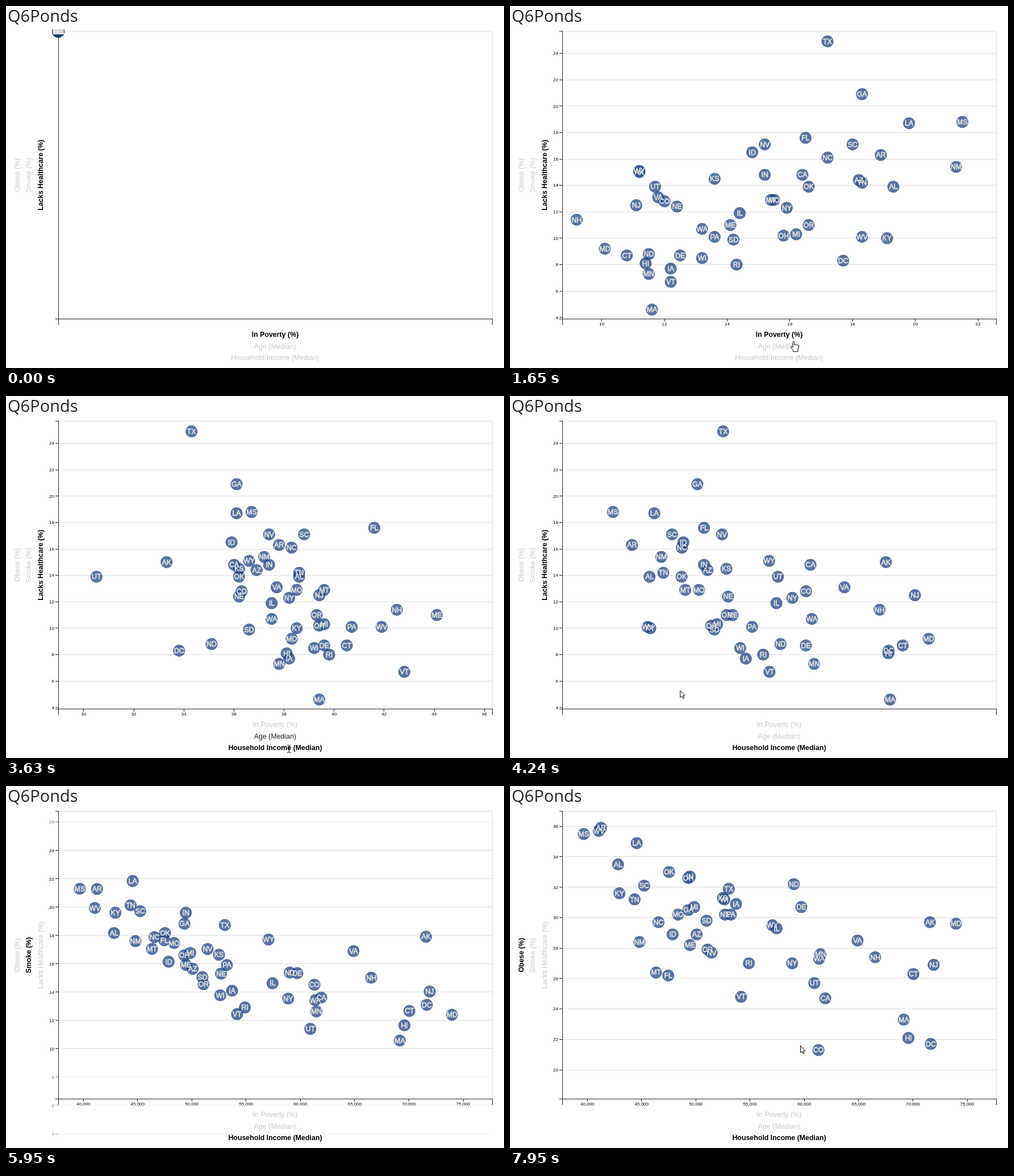
Write an HTML page that moves like this. It is 877x639 px and loops after 8 s.

```html
<!DOCTYPE html>
<html lang="en">
<head>
<meta charset="utf-8">
<title>Q6Ponds</title>
<style>
  html, body { margin: 0; width: 100%; height: 100%; overflow: hidden; background: #fff; }
  svg { display: block; width: 877px; height: 639px; font-family: "Liberation Sans", Arial, sans-serif; }
  .title { font: 500 29px "Open Sans", "Noto Sans", sans-serif; fill: #212529; }
  .axis, .frame, .tick line { fill: none; stroke: #222; shape-rendering: crispEdges; }
  .frame, .tick .grid { stroke: #ddd; }
  .tick text { font-size: 8px; fill: #000; }
  .label { font-size: 12.4px; text-anchor: middle; }
  .dots circle { fill: #1e4484; fill-opacity: .75; }
  .dots text { font-size: 12.4px; text-anchor: middle; fill: #cfd3da; stroke: #dedede; stroke-width: .8; }
  .cursor path { fill: #fff; stroke: #000; stroke-linejoin: round; }
</style>
</head>
<body>
<script>
const LOOP = 8000, FADE = 1000, HOVER = 250;
const LEFT = 92, RIGHT = 856, TOP = 45, BOTTOM = 552;

const states = ("AL AK AZ AR CA CO CT DE DC FL GA HI ID IL IN IA KS KY LA ME MD MA MI MN MS MO " +
  "MT NE NV NH NJ NM NY NC ND OH OK OR PA RI SC SD TN TX UT VT VA WA WV WI WY").split(" ");

const poverty = [19.3, 11.2, 18.2, 18.9, 16.4, 12, 10.8, 12.5, 17.7, 16.5, 18.3, 11.4, 14.8,
  14.4, 15.2, 12.2, 13.6, 19.1, 19.8, 14.1, 10.1, 11.6, 16.2, 11.5, 21.5, 15.5,
  15.4, 12.4, 15.2, 9.2, 11.1, 21.3, 15.9, 17.2, 11.5, 15.8, 16.6, 16.6, 13.6,
  14.3, 18, 14.2, 18.3, 17.2, 11.7, 12.2, 11.8, 13.2, 18.3, 13.2, 11.2];

const age = [38.6, 33.3, 36.9, 37.8, 36, 36.3, 40.5, 39.6, 33.8, 41.6, 36.1, 38.1, 35.9,
  37.5, 37.4, 38.2, 36.2, 38.5, 36.1, 44.1, 38.3, 39.4, 39.6, 37.8, 36.7, 38.5,
  39.6, 36.2, 37.4, 42.5, 39.4, 37.2, 38.2, 38.3, 35.1, 39.4, 36.2, 39.3, 40.7,
  39.8, 38.8, 36.6, 38.6, 34.3, 30.5, 42.8, 37.7, 37.5, 41.9, 39.2, 36.6];

const income = [42830, 71580, 50070, 41260, 61930, 61300, 70050, 59720, 71650, 47460, 49320, 69590, 47860,
  57440, 49450, 53710, 52500, 42960, 44550, 49460, 73970, 69160, 49850, 61480, 39670, 48360,
  46330, 52690, 51450, 66530, 71920, 44800, 58880, 46560, 59030, 49310, 47530, 51080, 53230,
  54890, 45240, 50980, 44360, 53040, 60920, 54170, 64900, 61370, 41060, 52620, 57060];

const healthcare = [13.9, 15, 14.4, 16.3, 14.8, 12.8, 8.7, 8.7, 8.3, 17.6, 20.9, 8.1, 16.5,
  11.9, 14.8, 7.7, 14.5, 10, 18.7, 11, 9.2, 4.6, 10.3, 7.3, 18.8, 12.9,
  12.9, 12.4, 17.1, 11.4, 12.5, 15.4, 12.3, 16.1, 8.8, 10.2, 13.9, 11, 10.1,
  8, 17.1, 9.9, 14.2, 24.9, 13.9, 6.7, 13.1, 10.7, 10.1, 8.5, 15.1];

const smokes = [21.1, 19.9, 16.5, 24.7, 12.8, 15.7, 15.4, 19.9, 16.4, 17.7, 17.4, 14.1, 15.9,
  16.5, 22.9, 18.5, 18.1, 26.2, 24, 19.3, 14.6, 14.7, 21.2, 16.3, 23, 20.6,
  19.9, 17.3, 17, 17.5, 15.1, 19.1, 14.4, 19.1, 19.9, 21, 21.1, 17, 19.9,
  16.3, 21.5, 18.6, 24.2, 14.5, 9.7, 16.4, 19.5, 15.3, 26.7, 17.4, 19.5];

const obesity = [33.5, 29.7, 28.9, 35.9, 24.7, 21.3, 26.3, 30.7, 21.7, 26.2, 30.5, 22.1, 28.9,
  29.3, 32.7, 30.9, 31.3, 31.6, 34.9, 28.2, 29.6, 23.3, 30.7, 27.6, 35.5, 30.2,
  26.4, 30.2, 27.7, 27.4, 26.9, 28.4, 27, 29.7, 32.2, 32.6, 33, 27.9, 30.2,
  27, 32.1, 29.8, 31.2, 31.9, 25.7, 24.8, 28.5, 27.3, 35.7, 31.2, 29.5];

const NS = "http://www.w3.org/2000/svg";
function add(parent, tag, attrs = {}, text) {
  const el = document.createElementNS(NS, tag);
  for (const k in attrs) el.setAttribute(k, attrs[k]);
  if (text !== undefined) el.textContent = text;
  return parent.appendChild(el);
}
const lerp = (a, b, k) => a + (b - a) * k;
const clamp = v => Math.max(0, Math.min(1, v));
const cubic = k => k < .5 ? 4 * k ** 3 : 1 - 4 * (1 - k) ** 3;

// One measure: linear scale padded around its data, plus its ticks.
function measure(data, [padLo, padHi], [from, to], step) {
  const lo = Math.min(...data) * padLo, hi = Math.max(...data) * padHi, ticks = [];
  for (let v = Math.ceil(lo / step) * step; v <= hi; v += step) ticks.push(v);
  return { data, ticks, scale: v => from + (v - lo) / (hi - lo) * (to - from) };
}
const xMeasure = (data, step) => measure(data, [.95, 1.05], [LEFT, RIGHT], step);
const yMeasure = data => measure(data, [.85, 1.03], [BOTTOM, TOP], 2);

// "at" is the click, "lit" the moment the pointer reaches the label.
const xSteps = [
  { at: 11, lit: -HOVER, text: "In Poverty (%)", pos: 584.3, ...xMeasure(poverty, 2) },
  { at: 1957, lit: 1650, text: "Age (Median)", pos: 604.5, ...xMeasure(age, 2) },
  { at: 3590, lit: 2850, text: "Household Income (Median)", pos: 625, ...xMeasure(income, 5000) }
];
const ySteps = [
  { at: 11, lit: -HOVER, text: "Lacks Healthcare (%)", pos: 64.5, ...yMeasure(healthcare) },
  { at: 5429, lit: 4950, text: "Smoke (%)", pos: 44.3, ...yMeasure(smokes) },
  { at: 6950, lit: 6300, text: "Obese (%)", pos: 24, ...yMeasure(obesity) }
];

const svg = add(document.body, "svg", { viewBox: "0 0 877 639" });
add(svg, "text", { class: "title", x: 3, y: 28 }, "Q6Ponds");
add(add(svg, "clipPath", { id: "stage" }), "rect", { y: 41, width: 877, height: 598 });
const chart = add(svg, "g", { "clip-path": "url(#stage)" });
add(chart, "path", { class: "frame", d: "M92.5 44.5H856.5V552.5" });

function makeTicks(steps, draw) {
  const values = [...new Set(steps.flatMap(s => s.ticks))];
  return values.map(value => {
    const el = add(chart, "g", { class: "tick" });
    draw(el, value.toLocaleString("en-US"));
    return { value, el };
  });
}
const xTicks = makeTicks(xSteps, (g, text) => {
  add(g, "line", { y1: 552, y2: 557 });
  add(g, "text", { y: 564.3, "text-anchor": "middle" }, text);
});
const yTicks = makeTicks(ySteps, (g, text) => {
  add(g, "line", { class: "grid", x1: 93, x2: 856 });
  add(g, "line", { x1: 87, x2: 92 });
  add(g, "text", { x: 85, y: 2.8, "text-anchor": "end" }, text);
});
add(chart, "path", { class: "axis", d: "M92.5 563V552.5H856.5V563" });
add(chart, "path", { class: "axis", d: "M87 44.5H92.5V552.5H87" });

const dots = add(chart, "g", { class: "dots" });
const circles = states.map(() => add(dots, "circle", { r: 10.6 }));
const names = states.map(s => add(dots, "text", { dy: 4.3 }, s));

for (const s of xSteps) s.el = add(chart, "text", { class: "label", x: 474, y: s.pos }, s.text);
for (const s of ySteps)
  s.el = add(chart, "text", { class: "label", transform: `translate(${s.pos} 298.5) rotate(-90)` }, s.text);

const cursor = add(svg, "g", { class: "cursor" });
const shapes = {
  arrow: "M.5 .5V12.5L3.3 10L5.2 14.4L7.2 13.5L5.4 9.3H9Z",
  hand: "M-3 -8.5Q-1.5 -10.5 -.3 -8.5V-3H5Q7.5 -2.5 7.3 0L6 6V9H-2.5V6.5L-6.5 1.5Q-6.5 -.5 -4.5 0L-3 1.5Z",
  beam: "M-2.5 -6.5H-.5L.5 -5.5L1.5 -6.5H3.5M.5 -5.5V5.5M-2.5 6.5H-.5L.5 5.5L1.5 6.5H3.5"
};
for (const k in shapes) shapes[k] = add(cursor, "path", { d: shapes[k] });

// time, x, y, shape from then on
const pointer = [
  [930, 862, 430, "arrow"], [1250, 720, 520, "arrow"],
  [1650, 501, 601, "hand"], [1957, 501, 601, "beam"],
  [2700, 501, 601, "arrow"], [2850, 498, 623, "hand"],
  [3590, 498, 623, "beam"], [3720, 498, 623, "arrow"],
  [4240, 300, 520, "arrow"], [4650, 22, 400, "arrow"],
  [4950, 40, 330, "hand"], [5429, 40, 330, "beam"],
  [5600, 40, 330, ""], [6150, 24, 400, "arrow"],
  [6300, 19, 316, "hand"], [6950, 19, 316, "beam"],
  [7150, 19, 316, "arrow"], [7690, 430, 440, "arrow"], [7850, 511, 458, "arrow"]
];

function phase(steps, t) {
  let i = steps.length - 1;
  while (i > 0 && t < steps[i].at) i--;
  return { now: steps[i], was: steps[i - 1], k: cubic(clamp((t - steps[i].at) / FADE)) };
}

function drawTicks(ticks, { now, was, k }, place) {
  for (const { value, el } of ticks) {
    const stays = now.ticks.includes(value), old = !!was && was.ticks.includes(value);
    const alpha = stays ? (old ? 1 : k) : old ? 1 - k : 0;
    el.setAttribute("opacity", alpha);
    el.setAttribute("transform", place(lerp((was || now).scale(value), now.scale(value), k)));
  }
}

function drawLabels(steps, t) {
  steps.forEach((s, i) => {
    const end = steps[i + 1] ? steps[i + 1].at : Infinity;
    const shade = t < end ? clamp((t - s.lit) / HOVER) : 1 - clamp((t - end) / HOVER);
    const grey = Math.round(200 * (1 - shade));
    const bold = t < end && (i === 0 || t >= s.at);
    s.el.setAttribute("fill", `rgb(${grey},${grey},${grey})`);
    s.el.setAttribute("font-weight", bold ? 700 : 400);
  });
}

function drawCursor(t) {
  const i = pointer.findLastIndex(p => p[0] <= t);
  const a = pointer[i], b = pointer[i + 1] || a;
  for (const k in shapes) shapes[k].style.display = a && a[3] === k ? "" : "none";
  if (!a) return;
  const k = a === b ? 0 : (t - a[0]) / (b[0] - a[0]);
  cursor.setAttribute("transform", `translate(${lerp(a[1], b[1], k)} ${lerp(a[2], b[2], k)})`);
}

function render(t) {
  const px = phase(xSteps, t), py = phase(ySteps, t);
  const spot = ({ now, was, k }, i, home) =>
    lerp(was ? was.scale(was.data[i]) : home, now.scale(now.data[i]), k);
  states.forEach((_, i) => {
    const x = spot(px, i, LEFT), y = spot(py, i, TOP);
    circles[i].setAttribute("cx", x);
    circles[i].setAttribute("cy", y);
    names[i].setAttribute("x", x);
    names[i].setAttribute("y", y);
  });
  drawTicks(xTicks, px, x => `translate(${x} 0)`);
  drawTicks(yTicks, py, y => `translate(0 ${y})`);
  drawLabels(xSteps, t);
  drawLabels(ySteps, t);
  drawCursor(t);
}

const start = performance.now();
function loop() {
  render((performance.now() - start) % LOOP);
  requestAnimationFrame(loop);
}
loop();
</script>
</body>
</html>
```
